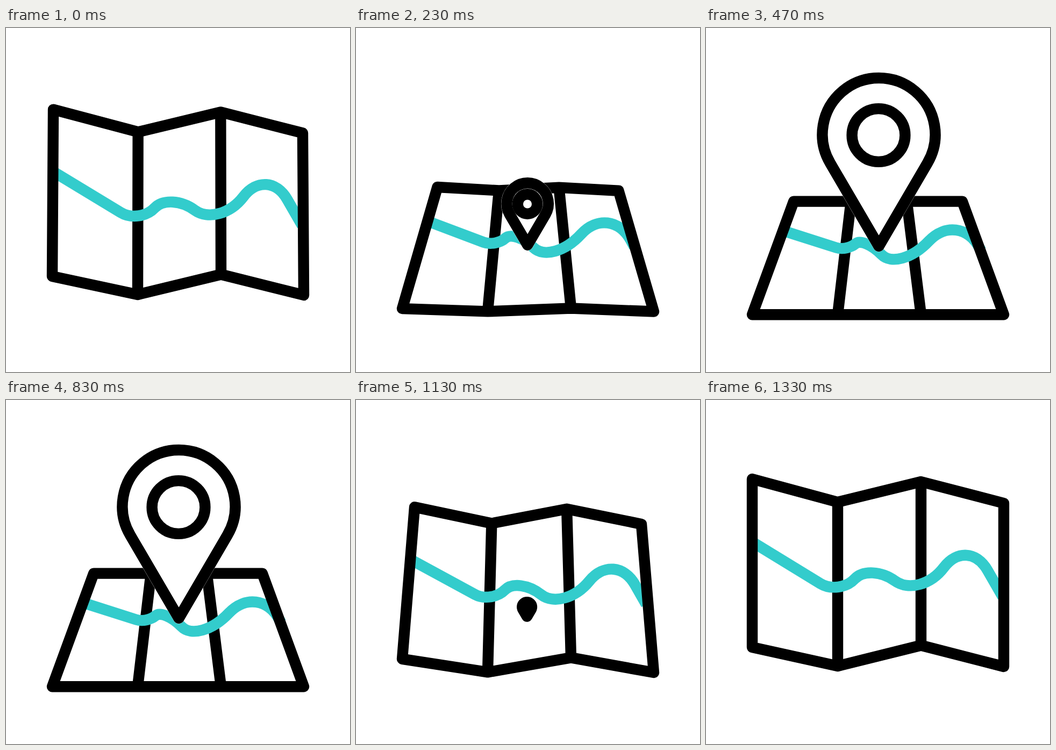
Write an HTML page that moves like this. It is 640 by 640 pixels and loops after 1.67 s.

```html
<!DOCTYPE html>
<html lang="en">
<head>
<meta charset="utf-8">
<title>Folding map with pin</title>
<style>
  html, body { margin: 0; width: 100%; height: 100%; overflow: hidden; background: #fff; }
  svg { display: block; width: 100vw; height: 100vh; }
  path, circle { fill: none; stroke: #000; stroke-width: 20.4; stroke-linejoin: round; }
  #river { stroke: #33cccc; }
  #halo { fill: #fff; stroke: #fff; stroke-width: 20.9; }
  #drop { fill: #fff; }
</style>
</head>
<body>
<svg viewBox="0 0 640 640">
  <path id="folds"/>
  <path id="river"/>
  <path id="border"/>
  <g id="pin">
    <path id="halo"/>
    <g id="ink">
      <path id="drop"/>
      <circle id="ring"/>
    </g>
  </g>
</svg>
<script>
const LOOP = 1670, FRAME = 100 / 3;
const el = id => document.getElementById(id);

// Folds of the standing map; lying down, the far edge shrinks toward the middle
const columns = [
  { x: 86, top: 147, bottom: 460 },
  { x: 245, top: 190, bottom: 495 },
  { x: 400, top: 152, bottom: 456.5 },
  { x: 554, top: 192, bottom: 496 },
];
const FAR_EDGE = 322.6, NEAR_EDGE = 533.2, FAR_SCALE = 0.67;

// Corners of the river's guide line: standing x, y, then lying x, y
const bends = [
  [86, 264, 146, 378],
  [248, 363, 262, 415],
  [305, 303, 294, 388],
  [398, 370, 359, 455],
  [487, 253, 470, 338],
  [552, 366, 511.5, 414],
];
const ROUNDING = 0.55;

// Pin: a circle joined to its tip by tangents
const HEAD = 105, HEIGHT = 208, RING = 49.4, RING_HEIGHT = 206.5;

const lerp = (a, b, t) => a + (b - a) * t;
const between = (a, b, t) => [lerp(a[0], b[0], t), lerp(a[1], b[1], t)];
const dist = (a, b) => Math.hypot(a[0] - b[0], a[1] - b[1]);
const setPath = (id, d) => el(id).setAttribute('d', d);

function ease(frame, start, end) {
  const u = Math.min(1, Math.max(0, (frame - start) / (end - start)));
  return u * u * (3 - 2 * u);
}

function drawMap(p) {
  const top = columns.map(c =>
    [lerp(c.x, lerp(320, c.x, FAR_SCALE), p), lerp(c.top, FAR_EDGE, p)]);
  const bottom = columns.map(c => [c.x, lerp(c.bottom, NEAR_EDGE, p)]);
  setPath('border', 'M' + [...top, ...[...bottom].reverse()].join('L') + 'Z');
  setPath('folds', [1, 2].map(i => `M${top[i]}L${bottom[i]}`).join(''));
}

// Round every corner of the guide line; the curves meet halfway between corners
function drawRiver(p) {
  const v = bends.map(([x, y, lx, ly]) => between([x, y], [lx, ly], p));
  const last = v.length - 1;
  const joints = v.slice(1).map((b, i) => between(v[i], b, 0.5));
  const sameReach = (corner, joint, end) =>
    between(corner, end, Math.min(1, dist(corner, joint) / dist(corner, end)));
  joints[0] = sameReach(v[1], joints[1], v[0]);
  joints[last - 1] = sameReach(v[last - 1], joints[last - 2], v[last]);

  let d = `M${v[0]}L${joints[0]}`;
  for (let i = 1; i < last; i++) {
    const a = joints[i - 1], b = joints[i];
    d += `C${between(a, v[i], ROUNDING)} ${between(b, v[i], ROUNDING)} ${b}`;
  }
  setPath('river', d + `L${v[last]}`);
}

// The pin grows from its tip while its line weight stays the same
function drawPin(k, inked) {
  el('pin').style.display = k > 0.001 ? '' : 'none';
  el('ink').style.display = inked ? '' : 'none';
  const x = 317.8 + 3.7 * k, y = 402.3 + 3.7 * k, r = HEAD * k;
  const sin = HEAD / HEIGHT, cos = Math.sqrt(1 - sin * sin);
  const side = HEIGHT * cos * k, dx = side * sin, sideY = y - side * cos;
  const d = `M${x} ${y}L${x - dx} ${sideY}A${r} ${r} 0 1 1 ${x + dx} ${sideY}Z`;
  setPath('halo', d);
  setPath('drop', d);
  const ring = { cx: x - 0.5 * k, cy: y - RING_HEIGHT * k, r: RING * k };
  for (const name in ring) el('ring').setAttribute(name, ring[name]);
}

function draw(now) {
  const frame = Math.floor((now % LOOP + 4) / FRAME) % 50;
  const fold = ease(frame, -1.03, 9.62) - ease(frame, 25, 39.1);
  drawMap(fold);
  drawRiver(fold);
  drawPin(ease(frame, 2.13, 13.96) - ease(frame, 26.18, 35.7), frame > 4);
}

let start;
function tick(now) {
  start ??= now;
  draw(now - start);
  requestAnimationFrame(tick);
}
draw(0);
requestAnimationFrame(tick);
</script>
</body>
</html>
```
